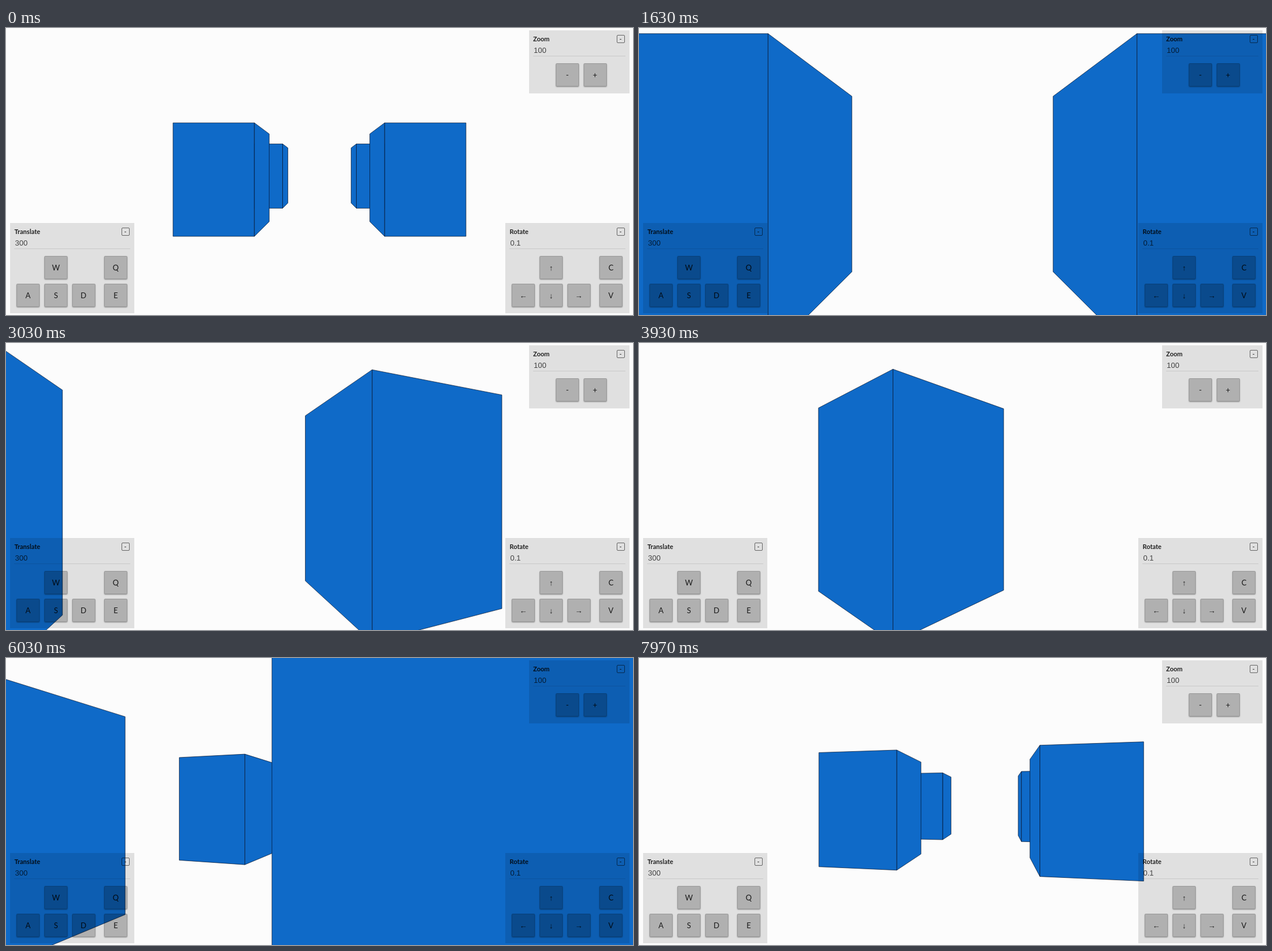
Animation of 1080x496 px, one loop 8 s. Source, as an HTML page with a canvas:

```html
<!DOCTYPE html>
<html lang="en">
<head>
<meta charset="utf-8">
<title>Box viewer</title>
<style>
  html, body { margin: 0; width: 100%; height: 100%; overflow: hidden; background: #fcfcfc; }
  canvas { position: absolute; left: 0; top: 0; }
  .panel { position: absolute; background: rgba(0, 0, 0, .11); font: 13px Lato, "Noto Sans", sans-serif; color: rgba(0, 0, 0, .86); }
  .panel * { position: absolute; box-sizing: border-box; }
  .title { left: 7.5px; top: 8px; font-size: 11px; font-weight: bold; line-height: 14px; }
  .value { left: 8.5px; top: 28px; font: 13px/14px "Liberation Sans", Arial, sans-serif; color: rgba(0, 0, 0, .7); }
  .rule { left: 7px; right: 7px; top: 44px; height: 1px; background: rgba(0, 0, 0, .1); }
  .fold { right: 8px; top: 8px; width: 14px; height: 14px; border: 1px solid rgba(0, 0, 0, .55); border-radius: 2px; font-size: 11px; line-height: 12px; text-align: center; }
  .key { width: 40px; height: 40px; border: 1px solid rgba(0, 0, 0, .32); border-radius: 2px; background: rgba(0, 0, 0, .21); background-clip: padding-box; box-shadow: 0 1px 2px rgba(0, 0, 0, .35); line-height: 39px; text-align: center; }
  .arrow { font-family: "Liberation Sans", Arial, sans-serif; }
</style>
</head>
<body>
<canvas width="1080" height="496"></canvas>
<script>
const LOOP = 8000, FOCAL = 476.5, CX = 540, CY = 248, TOP = -150, BOTTOM = 200, NEAR = 1;
const ctx = document.querySelector('canvas').getContext('2d');

function addPanel(x, y, w, h, title, value, keys) {
  const panel = document.createElement('div');
  panel.className = 'panel';
  panel.style.cssText = `left:${x}px;top:${y}px;width:${w}px;height:${h}px`;
  const keyClass = label => /[←-↓]/.test(label) ? 'key arrow' : 'key';
  panel.innerHTML = `<div class="title">${title}</div><div class="value">${value}</div>
    <div class="rule"></div><div class="fold">-</div>` +
    keys.map(([label, kx, ky]) => `<div class="${keyClass(label)}" style="left:${kx}px;top:${ky}px">${label}</div>`).join('');
  document.body.append(panel);
}
const ROW1 = 57, ROW2 = 105;
const pad = ([up, a, b, c, right1, right2]) => [
  [up, 59, ROW1], [a, 11, ROW2], [b, 59, ROW2], [c, 106.5, ROW2], [right1, 162, ROW1], [right2, 162, ROW2]];
addPanel(900.5, 4, 173, 108.5, 'Zoom', '100', [['-', 46.5, ROW1], ['+', 94, ROW1]]);
addPanel(7, 336.5, 213.5, 156, 'Translate', '300', pad('WASDQE'));
addPanel(860, 336.5, 213.5, 156, 'Rotate', '0.1', pad('↑←↓→CV'));

// Corners of each box in plan view, starting with its front wall from left to right
const boxes = [];
for (const x of [-450, 200])
  for (const z of [850, 1500])
    boxes.push([[x, z], [x + 250, z], [x + 250, z + 250], [x, z + 250]]);

// Key presses: each moves 300 units or turns 0.1 rad at once
const presses = [
  ['W', 600, 880, 1160, 1450],
  ['→', 2300, 2550, 2790, 3010, 3270, 3510, 3730, 3930, 4130, 4370, 4580, 4790, 4990],
  ['S', 5250, 5650, 6170],
  ['→', 6700],
  ['A', 7250],
  ['S', 7830]
];

function cameraAt(time) {
  const cam = { x: 0, z: 0, angle: 0 };
  const move = (side, ahead) => {
    const c = Math.cos(cam.angle), s = Math.sin(cam.angle);
    cam.x += 300 * (side * c + ahead * s);
    cam.z += 300 * (ahead * c - side * s);
  };
  const actions = {
    W: () => move(0, 1), S: () => move(0, -1), A: () => move(-1, 0), '→': () => cam.angle += 0.1
  };
  for (const [key, ...times] of presses)
    for (const at of times) if (time >= at - 8) actions[key]();
  return cam;
}

function drawWall(p, q) {
  if (p[0] * q[1] - p[1] * q[0] >= 0) return;      // faces away
  if (p[1] < NEAR && q[1] < NEAR) return;
  const clip = (a, b) => {
    if (a[1] >= NEAR) return a;
    const k = (NEAR - a[1]) / (b[1] - a[1]);
    return [a[0] + (b[0] - a[0]) * k, NEAR];
  };
  const project = ([x, z], y) => [CX + x * FOCAL / z, CY + y * FOCAL / z];
  const a = clip(p, q), b = clip(q, p);
  ctx.beginPath();
  ctx.moveTo(...project(a, TOP));
  ctx.lineTo(...project(b, TOP));
  ctx.lineTo(...project(b, BOTTOM));
  ctx.lineTo(...project(a, BOTTOM));
  ctx.closePath();
  ctx.fill();
  ctx.stroke();
}

function draw(time) {
  const cam = cameraAt(time), c = Math.cos(cam.angle), s = Math.sin(cam.angle);
  const toView = ([x, z]) => {
    const dx = x - cam.x, dz = z - cam.z;
    return [dx * c - dz * s, dx * s + dz * c];
  };
  const distance = box => Math.hypot(box[0][0] + box[2][0], box[0][1] + box[2][1]);
  ctx.fillStyle = '#fcfcfc';
  ctx.fillRect(0, 0, 1080, 496);
  ctx.fillStyle = '#0f6ac8';
  ctx.strokeStyle = 'rgba(0, 10, 30, .65)';
  ctx.lineWidth = 1;
  ctx.lineJoin = 'round';
  boxes.map(box => box.map(toView))
    .sort((a, b) => distance(b) - distance(a))
    .forEach(box => box.forEach((p, i) => drawWall(p, box[(i + 1) % 4])));
}

const start = performance.now();
function tick() {
  draw((performance.now() - start) % LOOP);
  requestAnimationFrame(tick);
}
tick();
</script>
</body>
</html>
```
